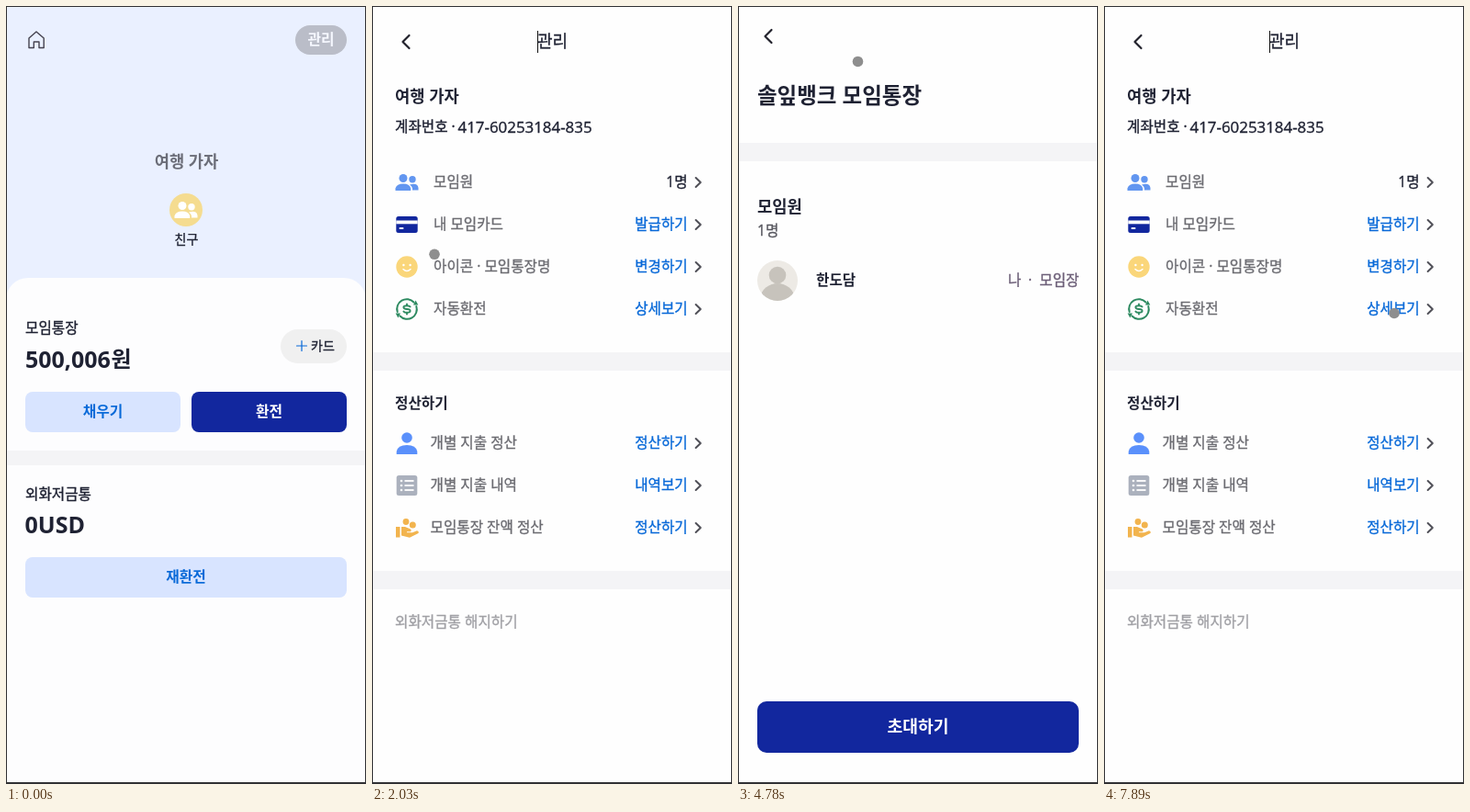
An HTML page that plays this animation: 392 by 847 pixels, repeating every 8 s.

```html
<!DOCTYPE html>
<html lang="ko">
<head>
<meta charset="utf-8">
<title>모임통장</title>
<style>
html, body { margin: 0; width: 100%; height: 100%; overflow: hidden; background: #fefefe; }
svg { display: block; width: 100vw; height: 100vh; }
text { font-family: "Open Sans", "Noto Sans CJK KR", "Noto Sans CJK", sans-serif; }
</style>
</head>
<body>
<svg id="stage" viewBox="0 0 392 847" xmlns="http://www.w3.org/2000/svg"></svg>
<script>
const LOOP = 8000;
const INK = '#1f2233', BLUE = '#0869d8', NAVY = '#12279e', PALE = '#d8e4ff';
const GRAY = '#6c6c72', MAUVE = '#6d5f78', BAND = '#f4f4f6';

// Text placed by its vertical centre; a hairline stroke gives the medium weight.
function text(str, x, cy, { size = 15.65, weight = 500, fill = INK, anchor = 'start' } = {}) {
  const medium = weight === 500 ? `stroke="${fill}" stroke-width=".35"` : '';
  return `<text x="${x}" y="${cy + size * 0.37}" font-size="${size}" font-weight="${medium ? 400 : weight}" ` +
    `fill="${fill}" text-anchor="${anchor}" ${medium}>${str}</text>`;
}
const box = (x, y, w, h, fill, r = 0) =>
  `<rect x="${x}" y="${y}" width="${w}" height="${h}" rx="${r}" fill="${fill}"/>`;
const band = (y, h = 20) => box(0, y, 392, h, BAND);
const dot = (x, y, r, fill) => `<circle cx="${x}" cy="${y}" r="${r}" fill="${fill}"/>`;
const shape = (d, fill) => `<path d="${d}" fill="${fill}"/>`;
const line = (d, stroke, width = 2) =>
  `<path d="${d}" fill="none" stroke="${stroke}" stroke-width="${width}" stroke-linecap="round" stroke-linejoin="round"/>`;
const at = (x, y, inner, turn = 0) => `<g transform="translate(${x} ${y}) rotate(${turn})">${inner}</g>`;
const button = (label, x, y, w, h, fill, color, r = 8, size = 15.8) =>
  box(x, y, w, h, fill, r) +
  text(label, x + w / 2, y + h / 2 - 1, { size, weight: 700, fill: color, anchor: 'middle' });
const back = (x, y) => at(x, y, line('M3.5 -7 L-3.5 0 L3.5 7', '#22222c', 2.2));

// Icons are drawn around their own centre.
const people = c =>
  dot(-4, -4.5, 4.5, c) + shape('M-12.5 9 V6.5 Q-11 1.5 -4 1.5 Q3 1.5 4.2 6.5 V9 Z', c) +
  dot(6, -3.2, 3.7, c) + shape('M3 2.6 Q11.5 0 12.5 6 V8.5 H6 V6.5 Q5.5 4 3 2.6 Z', c);
const GREEN = '#2d8a60';
const halfTurn = line('M-10.3 3 A10.6 10.6 0 0 1 7.5 -7.5', GREEN) + shape('M-12.3 4.6 L-7 4.6 L-9.6 9.5 Z', GREEN);
const icons = {
  people: people('#6296f0'),
  card: box(-11.7, -9, 23.4, 18, NAVY, 2.5) + box(-11.7, -4.5, 23.4, 3.8, '#fff') + box(-8.5, 3, 5, 2, '#fff', 1),
  smile: dot(0, 0, 11.7, '#fad67a') + dot(-3.6, -2, 1.2, '#fff') + dot(3.6, -2, 1.2, '#fff') +
    line('M-4 2.5 Q0 6.5 4 2.5', '#fff', 1.5),
  swap: halfTurn + at(0, 0, halfTurn, 180) +
    line('M3.6 -2.6 Q2.5 -3.8 0 -3.8 Q-3.6 -3.8 -3.6 -2 Q-3.6 0 0 0 Q3.6 0 3.6 2 Q3.6 3.8 0 3.8 Q-2.5 3.8 -3.6 2.6 M0 -5.6 V-4 M0 4 V5.6', GREEN, 1.9),
  person: dot(0, -6, 5.8, '#5a90fb') + shape('M-11.3 12 V9 Q-10 2 0 2 Q10 2 11.3 9 V12 Z', '#5a90fb'),
  list: box(-11.3, -11, 22.6, 22, '#abb1bd', 2.5) +
    [-5, 0, 5].map(y => dot(-6, y, 1.3, '#fff') + box(-2.5, y - 0.9, 10, 1.8, '#fff')).join(''),
  hand: dot(-1, -6.5, 3.4, '#f2b44e') + dot(6.3, -3, 3.5, '#f2b44e') + box(-12, -1, 4.5, 11.5, '#f2b44e') +
    shape('M-6 -1 H-2 L4 1.5 Q5.5 3 4 4.2 H0 V5.3 H6 L11 3.3 Q13.5 4 12.5 6 L3 10.8 L-6 8.5 Z', '#f2b44e')
};

const rows = (x, top, items) => items.map(([icon, label, action, color = BLUE], i) => {
  const cy = top + 46 * i;
  return at(38, cy + 0.5, icons[icon]) + text(label, x, cy - 0.5, { fill: GRAY }) +
    text(action, 343.7, cy - 0.5, { fill: color, anchor: 'end' }) +
    at(355.3, cy + 0.5, line('M-2.7 -5 L2.5 0 L-2.7 5', '#505058'));
}).join('');

const home =
  box(0, 0, 392, 330, '#eaf0ff') + box(0, 296, 392, 575, '#fdfdfe', 24) +
  line('M25 35 L33 28 L41.2 35 V45.5 H36 V39 H30.3 V45.5 H25 Z', '#45424f', 1.4) +
  button('관리', 315, 21, 56, 32, '#babdc8', '#f6f8ff', 16) +
  text('여행 가자', 196.5, 169, { size: 17.7, weight: 700, fill: '#6b6d78', anchor: 'middle' }) +
  dot(196, 222, 18, '#f5dc90') + at(196, 222, people('#fff')) +
  text('친구', 196.5, 253.5, { size: 14, anchor: 'middle' }) +
  text('모임통장', 21, 350.5) +
  text('500,006', 21, 384.5, { size: 25, weight: 700 }) +
  text('원', 114.5, 384, { size: 24, weight: 700 }) +
  box(299, 352, 72, 37, '#f0f0f0', 18.5) +
  line('M316.5 370 H327.5 M322 364.5 V375.5', BLUE, 1.2) +
  text('카드', 332, 369.5, { size: 14 }) +
  button('채우기', 21, 420, 169, 44, PALE, BLUE) +
  button('환전', 202, 420, 169, 44, NAVY, '#fff') +
  band(484, 16) +
  text('외화저금통', 21, 531) +
  text('0USD', 20.5, 564.5, { size: 25, weight: 700 }) +
  button('재환전', 21, 600, 350, 44, PALE, BLUE);

const manage =
  back(37, 39) +
  text('관리', 180, 38.5, { size: 18 }) +
  '<rect id="caret" x="180" y="27" width="1" height="24" fill="#111"/>' +
  text('여행 가자', 25, 98.5, { size: 17.7, weight: 700 }) +
  text('계좌번호 ·', 25, 131.5) +
  text('417-60253184-835', 93.5, 131.5, { size: 16.9 }) +
  rows(67, 191.5, [
    ['people', '모임원', '1명', INK], ['card', '내 모임카드', '발급하기'],
    ['smile', '아이콘 · 모임통장명', '변경하기'], ['swap', '자동환전', '상세보기']
  ]) +
  band(377) +
  text('정산하기', 25, 432, { weight: 700 }) +
  rows(63.5, 475.5, [
    ['person', '개별 지출 정산', '정산하기'], ['list', '개별 지출 내역', '내역보기'],
    ['hand', '모임통장 잔액 정산', '정산하기']
  ]) +
  band(615) +
  text('외화저금통 해지하기', 25, 670, { fill: '#a0a0a5' });

const invite =
  back(33, 33) +
  text('솔잎뱅크 모임통장', 21, 97, { size: 23.5, weight: 700 }) +
  band(149) +
  text('모임원', 21, 218, { size: 17.7, weight: 700 }) +
  text('1명', 21, 244, { fill: '#55555d' }) +
  '<clipPath id="face"><circle cx="43" cy="299" r="22"/></clipPath>' +
  dot(43, 299, 22, '#edeae5') + dot(43, 293, 9.3, '#c7c3bc') +
  '<ellipse cx="43" cy="317" rx="18" ry="15" fill="#c7c3bc" clip-path="url(#face)"/>' +
  text('한도담', 85, 298, { weight: 700 }) +
  text('나', 308.5, 298, { fill: MAUVE, anchor: 'end' }) +
  text('·', 318, 298, { fill: MAUVE, anchor: 'middle' }) +
  text('모임장', 371.5, 298, { fill: MAUVE, anchor: 'end' }) +
  button('초대하기', 21, 757, 350, 56, NAVY, '#fff', 10, 18.2);

const loader = [0, 1, 2, 3].map(i => dot(160 + 24.4 * i, 422.5, 6, NAVY)).join('');

const stage = document.getElementById('stage');
const layer = (id, inner) => `<g id="${id}">${inner}</g>`;
stage.innerHTML = box(0, 0, 392, 847, '#fefefe') +
  layer('home', home) + layer('manage', manage) + layer('invite', invite) + layer('loader', loader) +
  layer('cursor', dot(0, 0, 5.8, '#8e8e8e')) +
  shape('M0 0 H392 V847 H0 Z M1 1 V845 H391 V1 Z', '#303033');

const el = id => document.getElementById(id);
const layers = ['home', 'manage', 'invite', 'loader'].map(el);
const dots = [...el('loader').children];
const caret = el('caret'), cursor = el('cursor');

// Each visit blanks the stage, loads, then shows its page.
const visits = [
  { leave: 0, show: 0, page: 'home' },
  { leave: 1140, show: 1490, page: 'manage' },
  { leave: 3640, show: 4160, page: 'invite' },
  { leave: 5390, show: 5680, page: 'manage' }
];

// Cursor sweeps: a smooth curve through points evenly spaced in time.
const sweeps = [
  { from: 670, to: 740, via: [[382, 44.5], [358, 43.5]] },
  { from: 1620, to: 2500, via: [[358, 43.5], [380, 120], [45, 300], [190, 585], [340, 510]] },
  { from: 2500, to: 3500, via: [[340, 510], [60, 460], [248, 258], [283, 205], [331, 192]] },
  { from: 4360, to: 5200, via: [[331, 192], [240, 118], [131, 60.5], [32, 95], [49, 36.5]] },
  { from: 5810, to: 6440, via: [[49, 36.5], [60, 400], [180, 775], [310, 640], [250, 460]] },
  { from: 6570, to: 7560, via: [[250, 460], [125, 410], [150, 260], [290, 245], [316, 334.5]] }
];

const BLANK = 70, BLINK = 550, WAVE = 400, STAGGER = 120, LEAD = 210;
const clamp = v => Math.min(1, Math.max(0, v));

const spline = (a, b, c, d, u) =>
  b + u / 2 * (c - a + u * (2 * a - 5 * b + 4 * c - d + u * (3 * (b - c) + d - a)));

function cursorAt(t) {
  const { from, to, via } = sweeps.filter(s => s.from <= t).pop();
  const last = via.length - 1;
  const pos = clamp((t - from) / (to - from)) * last;
  const i = Math.min(last - 1, Math.floor(pos));
  const near = [-1, 0, 1, 2].map(k => via[Math.min(last, Math.max(0, i + k))]);
  return [0, 1].map(axis => spline(...near.map(p => p[axis]), pos - i));
}

function pulse(t, start) {
  dots.forEach((d, i) => {
    const k = Math.sin(Math.PI * clamp((t - start - i * STAGGER) / WAVE));
    d.setAttribute('r', 6.1 + 0.8 * k);
    d.setAttribute('fill-opacity', 0.25 + 0.15 * k);
  });
}

function render(t) {
  const { leave, show, page } = visits.filter(v => v.leave <= t).pop();
  const name = t >= show ? page : t >= leave + BLANK ? 'loader' : '';
  for (const l of layers) l.style.display = l.id === name ? '' : 'none';
  caret.style.display = Math.floor((t - show) / BLINK) % 2 ? 'none' : '';
  pulse(t, show - LEAD);
  const visible = t >= sweeps[0].from;
  cursor.style.display = visible ? '' : 'none';
  if (visible) cursor.setAttribute('transform', `translate(${cursorAt(t)})`);
}

const begin = performance.now();
function tick() {
  render((performance.now() - begin) % LOOP);
  requestAnimationFrame(tick);
}
tick();
</script>
</body>
</html>
```
